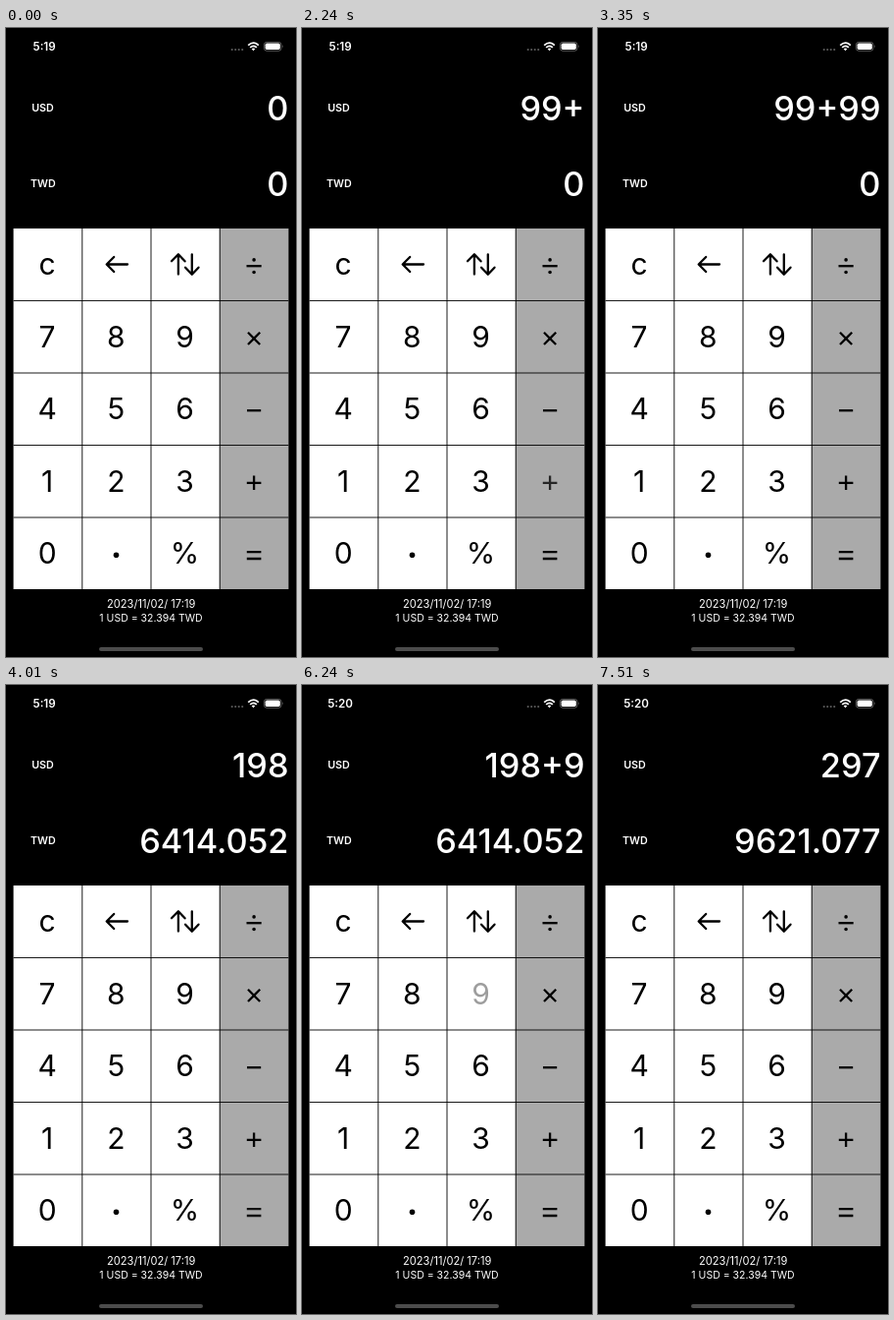
Animation, 296 px wide and 640 px high, one loop 8 s. Source, as an HTML page:

```html
<!DOCTYPE html>
<html lang="en">
<head>
<meta charset="utf-8">
<title>Currency calculator</title>
<style>
  html, body { margin: 0; width: 100%; height: 100%; overflow: hidden; background: #000; }
  svg { display: block; width: 296px; height: 640px; font-family: Inter, Roboto, sans-serif; }
  .display { font-size: 34.3px; font-weight: 500; fill: #fff; text-anchor: end; }
  .code { font-size: 10.7px; font-weight: 600; fill: #fff; text-anchor: middle; }
  .note { fill: #fff; text-anchor: middle; }
  .key { font-size: 30px; fill: #000; text-anchor: middle; }
  .icon { fill: none; stroke: #000; stroke-width: 2.3; }
  .round { stroke-linecap: round; stroke-linejoin: round; }
</style>
</head>
<body>
<svg viewBox="0 0 296 640">
  <rect width="296" height="640"/>

  <!-- status bar -->
  <text id="clock" x="39.1" y="23" font-size="11.6" font-weight="600" fill="#fff" text-anchor="middle">5:19</text>
  <path d="M230.7 22H242" stroke="#5a5a5a" stroke-width="2.2" stroke-linecap="round" stroke-dasharray="0 3.5"/>
  <g fill="none" stroke="#fff" stroke-width="1.8">
    <path d="M247.2 17.6Q252.5 12.6 257.8 17.6"/>
    <path d="M249.2 19.9Q252.5 16.8 255.8 19.9"/>
  </g>
  <path d="M250.7 21.3Q252.5 19.9 254.3 21.3L252.5 23.2Z" fill="#fff"/>
  <rect x="263.4" y="14.4" width="17.6" height="8.8" rx="2.7" fill="none" stroke="#777" stroke-width=".8"/>
  <rect x="264.6" y="15.6" width="15.2" height="6.4" rx="1.7" fill="#fff"/>
  <path d="M282 17.3q1.2 1.5 0 3z" fill="#777"/>

  <!-- amounts -->
  <text class="code" x="37.5" y="85">USD</text>
  <text class="code" x="37.8" y="161.5">TWD</text>
  <text class="display" id="top" x="288.5" y="94">0</text>
  <text class="display" id="bottom" x="288.5" y="170.7">0</text>

  <!-- keypad -->
  <rect x="7.6" y="204" width="210.6" height="367" fill="#fff"/>
  <rect x="218.2" y="204" width="70.2" height="367" fill="#aaa"/>
  <path id="grid" stroke="#000" stroke-width=".9"/>
  <g id="digits"></g>
  <circle cx="112.5" cy="536.3" r="2.8"/>
  <g class="icon round">
    <path d="M124 240.5H103M110.2 233L102.7 240.5L110.2 248"/>
    <path d="M175.9 250.5V230.5M169 237.3L175.9 230.3L182.6 237.3"/>
    <path d="M189.8 230.3V250.5M183.1 243.7L189.8 250.7L196.5 243.7"/>
  </g>
  <g class="icon">
    <path d="M245.5 242.2H260.7"/>
    <path d="M247 309.8L259.2 322M259.2 309.8L247 322"/>
    <path d="M246 389.2H260.2"/>
    <path id="plus" d="M245.8 462.8H260.4M253.1 455.5V470.1"/>
    <path id="equals" d="M245.8 533.2H260.4M245.8 540H260.4"/>
  </g>
  <circle cx="253.1" cy="235.9" r="1.8"/><circle cx="253.1" cy="248.5" r="1.8"/>

  <!-- rate -->
  <text class="note" x="148.2" y="590" font-size="11.1">2023/11/02/ 17:19</text>
  <text class="note" x="148" y="603.8" font-size="10.5">1 USD = 32.394 TWD</text>
  <rect x="95" y="630" width="106" height="4" rx="2" fill="#4c4c4c"/>
</svg>
<script>
  const LOOP = 8000, MINUTE_AT = 6080;
  const RATE = 32.3942;
  const DIM = 0.38, FADE = 340;
  const COL = 70.2, ROW = 73.5;
  const byId = id => document.getElementById(id);

  const keys = { '+': byId('plus'), '=': byId('equals') };
  ['c', '789', '456', '123', '0 %'].forEach((row, r) => {
    [...row].forEach((label, c) => {
      if (label === ' ') return;
      const el = document.createElementNS('http://www.w3.org/2000/svg', 'text');
      el.setAttribute('class', 'key');
      el.setAttribute('x', 42.1 + c * COL);
      el.setAttribute('y', 251 + r * ROW);
      el.textContent = label;
      byId('digits').append(el);
      keys[label] = el;
    });
  });

  let grid = '';
  for (let c = 1; c < 4; c++) grid += `M${7.6 + c * COL} 204V571`;
  for (let r = 1; r < 5; r++) grid += `M7.6 ${204 + r * ROW}H288.4`;
  byId('grid').setAttribute('d', grid);

  // key, finger down, finger up
  const taps = [
    ['9', 1030, 1110], ['9', 1190, 1340], ['+', 1970, 2090],
    ['9', 2710, 2790], ['9', 2870, 3030], ['=', 3680, 3800],
    ['+', 5370, 5490], ['9', 6080, 6160], ['9', 6240, 6470], ['=', 7030, 7110]
  ];

  // a key takes effect when released
  function amounts(t) {
    let top = '0', bottom = '0';
    for (const [key, , up] of taps) {
      if (up > t) break;
      if (key === '=') {
        const sum = top.split('+').reduce((a, b) => a + Number(b), 0);
        top = String(sum);
        bottom = (sum * RATE).toFixed(3);
      } else {
        top = top === '0' ? key : top + key;
      }
    }
    return { top, bottom };
  }

  // dim while held, then ease back to full strength
  function opacity(key, t) {
    const tap = taps.findLast(([k, down]) => k === key && down <= t);
    if (!tap) return 1;
    const p = Math.min(1, Math.max(0, (t - tap[2]) / FADE));
    return DIM + (1 - DIM) * Math.sin(p * Math.PI / 2);
  }

  function setText(id, text) {
    const el = byId(id);
    if (el.textContent !== text) el.textContent = text;
  }

  function draw() {
    const t = performance.now() % LOOP;
    const { top, bottom } = amounts(t);
    setText('top', top);
    setText('bottom', bottom);
    setText('clock', t < MINUTE_AT ? '5:19' : '5:20');
    for (const key of '9+=') keys[key].style.opacity = opacity(key, t);
    requestAnimationFrame(draw);
  }
  draw();
</script>
</body>
</html>
```
